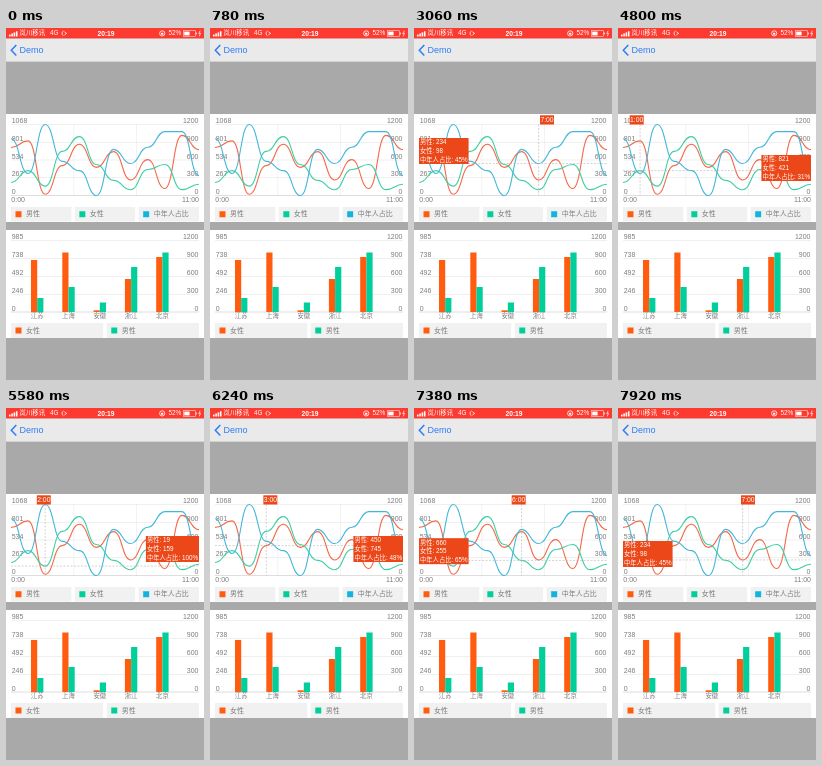
Write an HTML page with a canvas that moves like this. It is 198x352 px and loops after 8340 ms.

```html
<!DOCTYPE html>
<html lang="zh">
<head>
<meta charset="utf-8">
<title>Chart demo</title>
<style>
  html, body { margin: 0; width: 100%; height: 100%; overflow: hidden; background: #a9a9a9; }
  canvas { display: block; width: 198px; height: 352px; }
</style>
</head>
<body>
<canvas id="stage"></canvas>
<script>
const W = 198, H = 352, LOOP = 8340, STEP = 60;
const LEFT = 5, RIGHT = 193, GAP = (RIGHT - LEFT) / 11;
const PLOT_TOP = 96.5, PLOT_H = 71, TIP_H = 26;
const FONT = '"Liberation Sans", "Noto Sans CJK SC", "Noto Sans CJK", sans-serif';
const BAR_RED = '#ff5c10', BAR_GREEN = '#00cf9b', TIP = '#ec4718', GREY = '#7c7c7c';

// Lines: name, colour, value at the top of the scale, hourly values
const series = [
  { name: '男性', color: '#f4694a', max: 1068,
    values: [722, 821, 19, 450, 770, 423, 660, 234, 540, 105, 905, 690] },
  { name: '女性', color: '#3fcfa4', max: 1200,
    values: [220, 421, 159, 745, 995, 523, 255, 98, 440, 525, 100, 190] },
  { name: '中年人占比', color: '#42b7da', max: 100, unit: '%',
    values: [80, 31, 100, 48, 35, -42, 65, 45, 68, 90, 90, 28] }
];

// Bars: label, top of the first bar, top of the second
const cities = [
  ['江苏', 232, 270], ['上海', 224.5, 259], ['安徽', 282.3, 274.5],
  ['浙江', 251, 239], ['北京', 229, 224.5]
];

// Touches: start, end, then [time, finger x, tooltip y] along the way
const touches = [
  { from: 1680, to: 2280, path: [[1680, 31, 115]] },
  { from: 3060, to: 3840, path: [[3060, 133, 110]] },
  { from: 4800, to: LOOP, path: [
    [4800, 18.7, 127], [5040, 18.7, 127], [5580, 37.8, 128],
    [6960, 85, 128], [7920, 130, 133]
  ] }
];

const canvas = document.getElementById('stage');
const ratio = window.devicePixelRatio || 1;
canvas.width = W * ratio;
canvas.height = H * ratio;
const ctx = canvas.getContext('2d');
ctx.scale(ratio, ratio);

function box(x, y, w, h, color) {
  ctx.fillStyle = color;
  ctx.fillRect(x, y, w, h);
}

function text(str, x, y, size, color, align = 'left', weight = 400) {
  ctx.font = `${weight} ${size}px ${FONT}`;
  ctx.fillStyle = color;
  ctx.textAlign = align;
  ctx.textBaseline = 'middle';
  ctx.fillText(str, x, y);
}

function stroke(points, color, width) {
  ctx.beginPath();
  points.forEach(([x, y], i) => i ? ctx.lineTo(x, y) : ctx.moveTo(x, y));
  ctx.strokeStyle = color;
  ctx.lineWidth = width;
  ctx.stroke();
}

function statusBar() {
  box(0, 0, W, 10.6, '#fd3a2f');
  for (let i = 0; i < 4; i++) box(3 + i * 2.3, 6.6 - i * 1.1, 1.6, 1.9 + i * 1.1, '#fff');
  text('岚川移讯', 13.5, 5.7, 6.4, '#fff');
  text('4G', 44, 5.7, 6.4, '#fff');
  text('20:19', 100, 5.7, 6.7, '#fff', 'center', 700);
  text('52%', 162.5, 5.7, 6.4, '#fff');

  ctx.strokeStyle = '#fff';
  ctx.lineWidth = 0.8;
  ctx.beginPath();
  ctx.arc(58.6, 5.4, 2.6, 2, 4.3);
  ctx.moveTo(158.8, 5.4);
  ctx.arc(156.2, 5.4, 2.6, 0, Math.PI * 2);
  ctx.stroke();
  stroke([[58.4, 3.8], [60.6, 5.4], [58.4, 7]], '#fff', 0.8);
  box(155.1, 4.8, 2.2, 1.9, '#fff');
  ctx.strokeStyle = '#ffe4e0';
  ctx.lineWidth = 0.6;
  ctx.strokeRect(177.3, 2.7, 12, 5.6);
  box(178.2, 3.6, 5.4, 3.8, '#fff');
  box(189.9, 4.5, 0.8, 2, '#fff');
  stroke([[194.2, 2.6], [192.8, 5.7], [194.6, 5.3], [193.2, 8.4]], '#fff', 0.7);
}

function navBar() {
  box(0, 10.6, W, 23.4, '#eaeaeb');
  box(0, 33.5, W, 0.5, '#b8b8b8');
  stroke([[10.3, 17], [5.3, 22.3], [10.3, 27.6]], '#2f7cf6', 1.5);
  text('Demo', 13.5, 22.6, 9, '#2f7cf6');
}

function axes(top, left) {
  const right = [1200, 900, 600, 300, 0];
  right.forEach((value, i) => {
    const y = top + i * 17.8;
    box(LEFT, y - 0.25, RIGHT - LEFT, 0.5, i === 4 ? '#bdbdbd' : '#dedede');
    text(left[i], LEFT + 0.7, y - 3.4, 7, GREY);
    text(value, RIGHT - 0.5, y - 3.4, 7, GREY, 'right');
  });
}

function legend(y, h, items) {
  const w = (RIGHT - LEFT - 3.5 * (items.length - 1)) / items.length;
  items.forEach(([label, color], i) => {
    const x = LEFT + i * (w + 3.5);
    box(x, y, w, h, '#f1f1f1');
    box(x + 4.5, y + h / 2 - 3, 6, 6, color);
    text(label, x + 15, y + h / 2 + 0.3, 7, GREY);
  });
}

const hourX = i => LEFT + i * GAP;
const valueY = (s, i) => PLOT_TOP + PLOT_H * (1 - Math.max(0, s.values[i]) / s.max);

function curve(s) {
  ctx.beginPath();
  ctx.moveTo(LEFT, valueY(s, 0));
  for (let i = 1; i < s.values.length; i++) {
    const mid = hourX(i - 0.5), y = valueY(s, i);
    ctx.bezierCurveTo(mid, valueY(s, i - 1), mid, y, hourX(i), y);
  }
  ctx.strokeStyle = s.color;
  ctx.lineWidth = 1.1;
  ctx.stroke();
}

function lineChart() {
  box(0, 86, W, 108, '#fff');
  for (const k of [1, 2]) box(LEFT + k * 62.67, PLOT_TOP, 0.5, PLOT_H, '#e4e4e4');
  axes(96.4, [1068, 801, 534, 267, 0]);
  text('0:00', LEFT + 0.3, 171.8, 7, GREY);
  text('11:00', RIGHT, 171.8, 7, GREY, 'right');
  series.forEach(curve);
  const colors = [BAR_RED, BAR_GREEN, '#12b4de'];
  legend(179, 14.5, series.map((s, i) => [s.name, colors[i]]));
}

function barChart() {
  box(0, 202, W, 108, '#fff');
  axes(212.8, [985, 738, 492, 246, 0]);
  cities.forEach(([name, first, second], i) => {
    const x = 25 + i * 31.3;
    box(x, first, 6.2, 284 - first, BAR_RED);
    box(x + 6.2, second, 6.2, 284 - second, BAR_GREEN);
    text(name, x + 6.2, 288.2, 6.4, GREY, 'center');
  });
  legend(295, 15, [['女性', BAR_RED], ['男性', BAR_GREEN]]);
}

function position(path, t) {
  const next = path.findIndex(p => p[0] > t);
  if (next < 0) return path[path.length - 1].slice(1);
  const a = path[next - 1], b = path[next];
  const k = (t - a[0]) / (b[0] - a[0]);
  return [a[1] + (b[1] - a[1]) * k, a[2] + (b[2] - a[2]) * k];
}

// Dashed lines through the data point closest to the finger
function crosshair(i, fingerY) {
  const x = hourX(i);
  const y = series.map(s => valueY(s, i))
    .reduce((a, b) => Math.abs(b - fingerY) < Math.abs(a - fingerY) ? b : a);
  ctx.setLineDash([2, 1.5]);
  stroke([[x, PLOT_TOP], [x, PLOT_TOP + PLOT_H]], '#b4b4b4', 0.6);
  stroke([[LEFT, y], [RIGHT, y]], '#b4b4b4', 0.6);
  ctx.setLineDash([]);
}

function tooltip(x, y) {
  const i = Math.round((x - LEFT) / GAP);
  const lines = series.map(s => `${s.name}: ${s.values[i]}${s.unit || ''}`);
  crosshair(i, y + TIP_H / 2);
  box(x - 7, 87.3, 14, 9.2, TIP);
  text(`${i}:00`, x, 92, 6.8, '#fff', 'center');

  ctx.font = `400 6.3px ${FONT}`;
  const w = Math.max(...lines.map(s => ctx.measureText(s).width)) + 2;
  const left = x > (LEFT + RIGHT) / 2 ? LEFT : RIGHT - w;
  box(left, y, w, TIP_H, TIP);
  lines.forEach((s, n) => text(s, left + 1, y + 4.7 + n * 8.7, 6.3, '#fff'));
}

function draw(t) {
  box(0, 0, W, H, '#a9a9a9');
  statusBar();
  navBar();
  lineChart();
  barChart();
  const touch = touches.find(p => t >= p.from && t < p.to);
  if (touch) tooltip(...position(touch.path, t));
}

const start = performance.now();
function frame() {
  const t = (performance.now() - start) % LOOP;
  draw(Math.floor(t / STEP) * STEP);
  requestAnimationFrame(frame);
}
frame();
</script>
</body>
</html>
```
